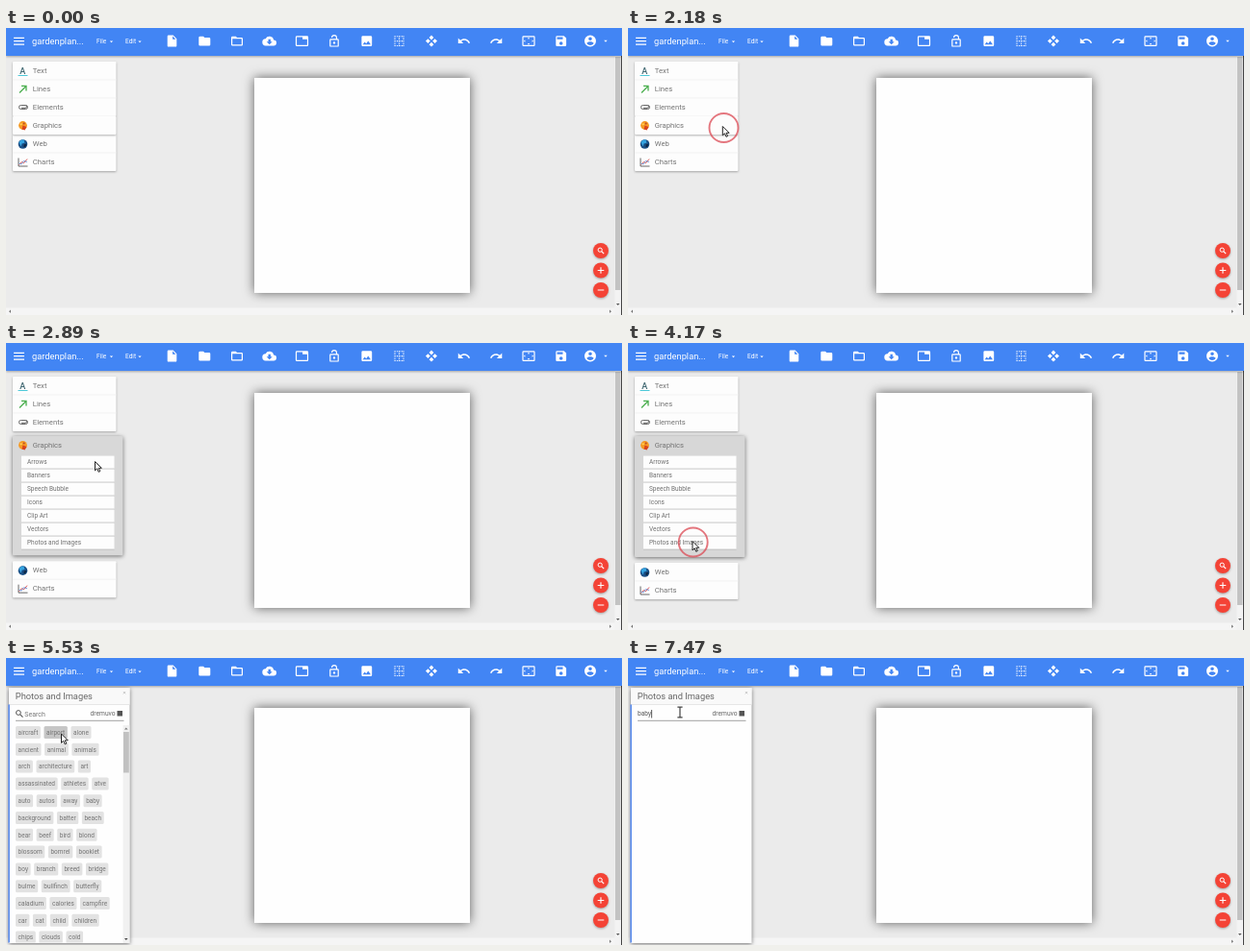
Write an HTML page that moves like this. It is 640 by 299 pixels and loops after 8000 ms.

```html
<!DOCTYPE html>
<html lang="en">
<head>
<meta charset="utf-8">
<title>Editor: photo search</title>
<style>
html, body { margin: 0; width: 100%; height: 100%; overflow: hidden; background: #ebebeb; }
svg { display: block; width: 100vw; height: 100vh; }
text { font-family: Roboto, Arial, sans-serif; white-space: pre; }
.soft { filter: drop-shadow(0 1px 1px rgba(0,0,0,.3)); }
.deep { filter: drop-shadow(0 1px 2px rgba(0,0,0,.55)); }
.page { filter: drop-shadow(0 0 6px rgba(0,0,0,.6)); }
</style>
</head>
<body>
<svg id="stage" viewBox="0 0 640 299" xmlns="http://www.w3.org/2000/svg">
  <defs>
    <clipPath id="bodyClip"><rect id="bodyBox" x="7" y="97" width="115" height="0"/></clipPath>
    <clipPath id="tagClip"><rect x="4" y="68" width="117" height="228.5"/></clipPath>
  </defs>
</svg>
<script>
const NS = 'http://www.w3.org/2000/svg';
const stage = document.getElementById('stage');
const bodyBox = document.getElementById('bodyBox');

function add(parent, tag, attrs) {
  const el = document.createElementNS(NS, tag);
  for (const k in attrs) el.setAttribute(k, attrs[k]);
  return parent.appendChild(el);
}
const group = (parent, attrs) => add(parent, 'g', attrs || {});
const rect = (parent, x, y, width, height, fill, extra) =>
  add(parent, 'rect', { x, y, width, height, fill, ...extra });
const path = (parent, d, fill, extra) => add(parent, 'path', { d, fill, ...extra });
const line = (parent, d, stroke, width, extra) =>
  path(parent, d, 'none', { stroke, 'stroke-width': width, ...extra });
const disc = (parent, cx, cy, r, fill, extra) => add(parent, 'circle', { cx, cy, r, fill, ...extra });
// cy is the visual middle of the text
function label(parent, x, cy, size, str, fill, extra) {
  const el = add(parent, 'text', { x, y: cy + size * .36, 'font-size': size, fill, ...extra });
  el.textContent = str;
  return el;
}
const show = (el, on) => el.setAttribute('opacity', +on);
const move = (el, x, y) => el.setAttribute('transform', `translate(${x} ${y})`);
const clamp = v => Math.max(0, Math.min(1, v));
const mix = (a, b, p) => a + (b - a) * p;

// ---- workspace
rect(stage, 0, 0, 640, 299, '#ebebeb');
rect(stage, 258, 52, 224, 224, '#fefefe', { class: 'page' });

// ---- scrollbars
rect(stage, 0, 291.5, 633, 7.5, '#f5f5f5');
rect(stage, 632.5, 29, 6.5, 270, '#f3f3f3');
rect(stage, 633, 30, 5.5, 243, '#c3c3c3');
rect(stage, 639, 29, 1, 270, '#444');
path(stage, 'M5 293.6v3.4l-2-1.7z', '#777');
path(stage, 'M627 293.6v3.4l2-1.7z', '#777');
path(stage, 'M634 287h3.6l-1.8 2z', '#555');

// ---- zoom buttons
for (const y of [232, 252.5, 273]) disc(stage, 618, y, 8, '#f44336', { class: 'soft' });
disc(stage, 617.2, 231.2, 2.1, 'none', { stroke: '#fff', 'stroke-width': 1 });
line(stage, 'M618.7 232.7l2.5 2.5', '#fff', 1.2);
line(stage, 'M614.7 252.5h6.6m-3.3-3.3v6.6M614.7 273h6.6', '#fff', 1.1);

// ---- accordion
const ROW = 19, LABEL = '#757575';
const card = (parent, y, h, cls) => rect(parent, 7, y, 107.5, h, '#fdfdfd', { rx: 1, class: cls });
function row(parent, y, name, draw) {
  label(parent, 27.8, y + 9, 7.7, name, LABEL);
  const g = group(parent);
  move(g, 17.5, y + 9.5);
  draw(g);
}
const rule = (parent, y) => line(parent, `M7 ${y}h107.5`, '#ececec', .7);

const upper = group(stage);
card(upper, 35, 57, 'soft');
row(upper, 35, 'Text', g => {
  label(g, -3.2, -.2, 9, 'A', '#37606b', { 'font-weight': 500 });
  line(g, 'M-5 5h10', '#4dc8d8', 1);
});
row(upper, 54, 'Lines', g => line(g, 'M-3.5 4L3.2-2.8M-1.5-3.2H3.5V2', '#4caf50', 1.3));
row(upper, 73, 'Elements', g =>
  line(g, 'M3 2H-2a2 2 0 0 1 0-4H2.6a1.4 1.4 0 0 1 0 2.8H-1.6M3-2a2 2 0 0 1 0 4', '#666', 1));
rule(upper, 54); rule(upper, 73);

const lower = group(stage);
card(lower, 111, 38, 'soft');
row(lower, 111, 'Web', g => {
  disc(g, 0, .5, 4.8, '#1a4f86');
  path(g, 'M-4-1.5Q-2-5 1-4L2-1-1 0-2 3z', '#35a3e0');
  path(g, 'M1 1L4 0 3 3 1 4z', '#0c2440');
});
row(lower, 130, 'Charts', g => {
  line(g, 'M-4.5-4V4.5H5', '#555', .9);
  line(g, 'M-4 3L-1 0 1 1.2 4.5-3', '#e0524d', 1);
  line(g, 'M-4 1.5L-1.5 2.5 1-1 4.5 0', '#5b8bd8', .8);
});
rule(lower, 130);

const middle = group(stage);
const midCard = card(middle, 92, ROW, 'soft');
row(middle, 92, 'Graphics', g => {
  disc(g, 0, 0, 4.4, '#f59a23');
  path(g, 'M0 0L4 1.5 2 5-1 4z', '#d9431e');
  disc(g, -1.8, -1.2, 1, '#ffd75e');
  disc(g, 1.2, -2, .9, '#b5432a');
});
const list = group(stage, { 'clip-path': 'url(#bodyClip)' });
['Arrows', 'Banners', 'Speech Bubble', 'Icons', 'Clip Art', 'Vectors', 'Photos and Images'].forEach((s, i) => {
  const y = 117.6 + 14 * i;
  rect(list, 16, y, 96.5, 13.3, '#fdfdfd');
  line(list, `M16 ${y + 13.5}h96.5`, '#b5b5b5', .7);
  label(list, 22, y + 6.5, 6.5, s, '#707070');
});

// ---- photo dialog
const dialog = group(stage);
rect(dialog, 3, 31, 125.5, 266, '#fefefe', { class: 'deep' });
rect(dialog, 3, 31, 125.5, 17.5, '#f9f9f9');
line(dialog, 'M3 48.5h125.5', '#dedede', .7);
rect(dialog, 2.3, 48.5, 1.6, 248, '#5b8def');
label(dialog, 9.8, 39.6, 9.3, 'Photos and Images', '#666');
line(dialog, 'M121.8 35l2.4 2.4m0-2.4l-2.4 2.4', '#aaa', .6);
line(dialog, 'M10 65.3h112.5', '#8a8a8a', .8);
label(dialog, 87.5, 57.5, 6.7, 'dremuvo', '#666');
rect(dialog, 115.5, 55, 5.5, 5.5, '#555');

const hint = group(dialog);
disc(hint, 12.9, 57, 2.4, 'none', { stroke: '#555', 'stroke-width': 1 });
line(hint, 'M14.7 58.8l2.8 2.8', '#555', 1.1);
label(hint, 19.3, 58, 7, 'Search', '#777');
const typed = label(dialog, 10, 58, 6.6, '', '#555');
const caret = rect(dialog, 10, 54, .8, 8.5, '#333');

const tagBox = group(dialog, { 'clip-path': 'url(#tagClip)' });
const allTags = group(tagBox);
const tags = [];
function tag(parent, x, y, word) {
  const box = rect(parent, x, y, 10, 13, '#e2e2e2', { rx: 1.5 });
  const t = label(parent, x + 2.6, y + 6.4, 6.5, word, '#757575');
  const w = t.getComputedTextLength() + 5.2;
  box.setAttribute('width', w);
  tags.push({ box, x, y, w });
  return x + w + 3.6;
}
`aircraft airport alone
ancient animal animals
arch architecture art
assassinated athletes atve
auto autos away baby
background batter beach
bear beef bird blond
blossom bomrel booklet
boy branch breed bridge
bulme bullfinch butterfly
caladium calories campfire
car cat child children
chips clouds cold`.split('\n').forEach((words, i) => {
  let x = 10;
  for (const w of words.split(' ')) x = tag(allTags, x, 71 + 17.8 * i, w);
});
const match = group(tagBox);
tag(match, 10, 71, 'baby');

const bar = group(dialog);
rect(bar, 121.5, 70, 6.8, 227, '#f1f1f1');
rect(bar, 122, 77, 5.8, 42.5, '#c1c1c1');
path(bar, 'M123 74.5h3.6l-1.8-2z', '#777');
path(bar, 'M123 292h3.6l-1.8 2z', '#444');

// ---- top bar
rect(stage, 0, 0, 640, 29, '#4285f4', { class: 'soft' });
line(stage, 'M8 10.3h11m-11 3.4h11m-11 3.4h11', '#fff', 1.2);
label(stage, 27, 14, 9.3, 'gardenplan...', '#fff');
const caretDown = (x, y) => path(stage, `M${x - 1.7} ${y}h3.4l-1.7 1.9z`, '#fff');
label(stage, 94, 14, 6.5, 'File', '#fff');
label(stage, 124, 14, 6.5, 'Edit', '#fff');
caretDown(109.5, 13.4); caretDown(139, 13.4); caretDown(623, 12.8);

function icon(x, d, flip) {
  path(stage, d, '#fff', {
    'fill-rule': 'evenodd',
    transform: `translate(${x} 13.6) scale(${flip ? -.6 : .6} .6) translate(-12 -12)`
  });
}
const ARROW = 'M12.5 8c-2.6 0-5 1-6.9 2.6L2 7v9h9l-3.6-3.6c1.4-1.2 3.1-1.9 5.1-1.9 3.5 0 6.5 2.3 7.6 5.5l2.4-.8C21 11 17 8 12.5 8z';
icon(172.5, 'M6 2a2 2 0 0 0-2 2v16a2 2 0 0 0 2 2h12a2 2 0 0 0 2-2V8l-6-6zM13 9V3.5L18.5 9z');
icon(206.3, 'M10 4H4a2 2 0 0 0-2 2v12a2 2 0 0 0 2 2h16a2 2 0 0 0 2-2V8a2 2 0 0 0-2-2h-8z');
icon(240, 'M10 4H4a2 2 0 0 0-2 2v12a2 2 0 0 0 2 2h16a2 2 0 0 0 2-2V8a2 2 0 0 0-2-2h-8zM20 18H4V8h16z');
icon(273.7, 'M19.3 10A7.5 7.5 0 0 0 5.3 8 6 6 0 0 0 6 20h13a5 5 0 0 0 .3-10zM17 13l-5 5-5-5h3V9h4v4z');
icon(307.5, 'M21 3H3a2 2 0 0 0-2 2v14a2 2 0 0 0 2 2h18a2 2 0 0 0 2-2V5a2 2 0 0 0-2-2zM21 19H3V5h10v4h8z');
icon(341, 'M18 8h-1V6A5 5 0 0 0 7 6h1.9a3.1 3.1 0 0 1 6.2 0v2H6a2 2 0 0 0-2 2v10a2 2 0 0 0 2 2h12a2 2 0 0 0 2-2V10a2 2 0 0 0-2-2zM18 20H6V10h12zM10 15a2 2 0 0 1 4 0 2 2 0 0 1-4 0z');
icon(374.8, 'M21 19V5a2 2 0 0 0-2-2H5a2 2 0 0 0-2 2v14a2 2 0 0 0 2 2h14a2 2 0 0 0 2-2zM8.5 13.5l2.5 3 3.5-4.5 4.5 6H5z');
line(stage, 'M403.5 8.7h10m-10 4.9h10m-10 4.9h10M404 8.2v10.8m4.5-10.8v10.8m4.5-10.8v10.8', '#fff', 1.1,
  { 'stroke-dasharray': '1.3 1.1', opacity: .9 });
icon(442, 'M12 2l4 4-4 4-4-4zM12 14l4 4-4 4-4-4zM6 8l4 4-4 4-4-4zM18 8l4 4-4 4-4-4z');
icon(475.8, ARROW);
icon(509.3, ARROW, true);
icon(543, 'M21 3H3a2 2 0 0 0-2 2v14a2 2 0 0 0 2 2h18a2 2 0 0 0 2-2V5a2 2 0 0 0-2-2zM21 19H3V5h18zM12 5.5L10 8h4zM18 10v4l2.5-2zM6 10l-2.5 2L6 14zM10 16l2 2.5 2-2.5z');
icon(576.7, 'M17 3H5a2 2 0 0 0-2 2v14a2 2 0 0 0 2 2h14a2 2 0 0 0 2-2V7zM9 16a3 3 0 0 1 6 0 3 3 0 0 1-6 0zM15 9H5V5h10z');
icon(607, 'M2 12a10 10 0 0 1 20 0 10 10 0 0 1-20 0zM9 8a3 3 0 0 0 6 0 3 3 0 0 0-6 0zM12 19.2c-2.5 0-4.7-1.3-6-3.2 0-2 4-3.1 6-3.1s6 1.1 6 3.1c-1.3 1.9-3.5 3.2-6 3.2z');

// ---- pointer
const ring = disc(stage, 0, 0, 15, 'none', { stroke: '#dd4a55', 'stroke-opacity': .75, 'stroke-width': 1.9 });
const pointer = group(stage);
const arrow = path(pointer, 'M0 0V9.4L2.2 7.3 3.7 10.8 5.3 10.1 3.8 6.8H6.8z', '#fff',
  { stroke: '#222', 'stroke-width': 1, 'stroke-linejoin': 'round' });
const beam = line(pointer, 'M-2.6-5.3h2q.6 0 .6.6.0-.6.6-.6h2M-2.6 5.3h2q.6 0 .6-.6.0.6.6.6h2M0-4.7v9.4', '#444', 1.2);

// ---- timing: the picture advances in these discrete steps
const LOOP = 8000;
const STEPS = [0, 1020, 1160, 1300, 1440, 1580, 1720, 2180, 2460, 2600, 2750, 2890, 3040, 3190,
  3340, 3500, 3660, 3810, 3990, 4170, 4300, 4450, 4590, 4770, 4930, 5090, 5240, 5390, 5540,
  5690, 5850, 5990, 6490, 6790, 6970, 7150, 7470];
const PATH = [[1020, 185, 102.5], [1720, 98.3, 102.5], [2460, 98.3, 102.5], [2890, 92.5, 123.5],
  [3660, 67, 206.5], [4300, 67, 206.5], [4590, 67, 188], [4930, 65, 149.5], [5240, 60, 97],
  [5540, 55, 61], [5690, 54, 56.5]];
const CLICKS = [[2180, 2460, 99.5, 104], [4170, 4300, 67.7, 207.5], [5690, 5990, 54.3, 56.3]];
const KEYS = [6490, 6790, 6970, 7150];

function pointerAt(t) {
  const i = PATH.findIndex(k => k[0] > t);
  if (i < 0) return PATH[PATH.length - 1].slice(1);
  const a = PATH[Math.max(0, i - 1)], b = PATH[i];
  const p = b === a ? 0 : clamp((t - a[0]) / (b[0] - a[0]));
  return [mix(a[1], b[1], p), mix(a[2], b[2], p)];
}

function draw(time) {
  const t = STEPS.filter(s => s <= time).pop();

  const u = t < 2460 ? 0 : clamp((t - 2400) / 560);
  const p = 1 - (1 - u) ** 2;
  const tone = Math.round(mix(253, 215, p));
  move(middle, 0, 5 * p);
  move(lower, 0, 118 * p);
  midCard.setAttribute('height', mix(ROW, 126, p));
  midCard.setAttribute('width', mix(107.5, 114.5, p));
  midCard.setAttribute('fill', `rgb(${tone},${tone},${tone})`);
  midCard.setAttribute('class', p > 0 ? 'deep' : 'soft');
  bodyBox.setAttribute('height', u ? mix(ROW, 126, p) : 0);

  const q = clamp((t - 4300) / 290);
  show(dialog, q > 0);
  move(dialog, -132 * (1 - q) ** 2, 0);

  const [x, y] = pointerAt(t);
  const inField = q === 1 && y < 66;
  move(pointer, x, y);
  show(pointer, t >= 1020);
  show(arrow, !inField);
  show(beam, inField);

  const click = CLICKS.find(c => t >= c[0] && t < c[1]);
  show(ring, !!click);
  if (click) move(ring, click[2], click[3]);

  for (const g of tags) {
    const over = q === 1 && x > g.x && x < g.x + g.w && y > g.y && y < g.y + 13;
    g.box.setAttribute('fill', over ? '#c6c6c6' : '#e2e2e2');
  }

  typed.textContent = 'baby'.slice(0, KEYS.filter(k => k <= t).length);
  caret.setAttribute('x', 10.2 + (typed.textContent ? typed.getComputedTextLength() : 0));
  show(caret, t >= 5850);
  hint.setAttribute('opacity', t < 5690 ? 1 : t < 5850 ? .5 : 0);
  show(allTags, t < 6970);
  show(bar, t < 6970);
  show(match, t >= 6970 && t < 7470);
}

function tick() {
  draw(performance.now() % LOOP);
  requestAnimationFrame(tick);
}
tick();
</script>
</body>
</html>
```
